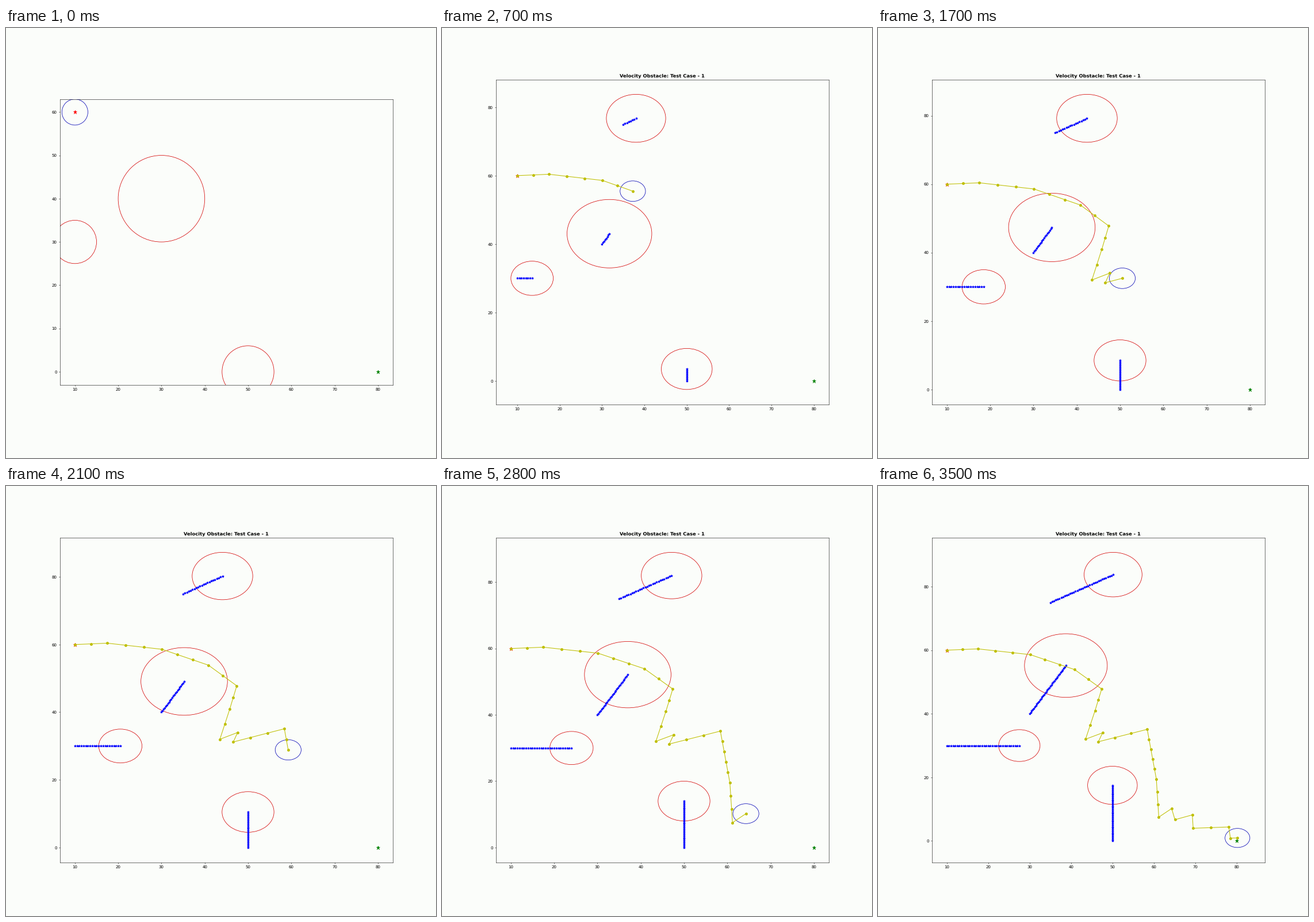
Recreate the animation shown at these times as a matplotlib script. Size 748x748 px, loop 3.6 s.

```python
import numpy as np
import matplotlib.pyplot as plt
from matplotlib.animation import FuncAnimation
from matplotlib.patches import Circle

STEPS = 36
START, GOAL = (10, 60), (80, 0)
ROBOT_R = 3
SPEED = 0.5
PAPER, RED, BLUE = "#fbfdfa", "#d40000", "#0000b4"

# x, y, radius, heading in degrees
OBSTACLES = [(10, 30, 5, 0), (50, 0, 6, 90), (30, 40, 10, 60), (35, 75, 7, 30)]

# Turning points of the robot: step, x, y
TURNS = [
    (0, *START), (2, 17.5, 60.4), (5, 30.1, 58.6), (8, 40.85, 53.9),
    (10, 47.4, 47.8), (12, 45.8, 41), (14, 43.5, 32), (15, 47.6, 34),
    (16, 46.6, 31.2), (19, 58.4, 35.1), (24, 60.6, 19.5), (27, 61.2, 7.5),
    (28, 64.3, 10.2), (29, 65.1, 6.7), (30, 69.3, 8.2), (31, 69.5, 4),
    (33, 78.1, 4.4), (34, 78.5, 0.9), (35, 80.2, 0.95),
]

plt.rcParams["text.hinting"] = "no_hinting"
fig = plt.figure(figsize=(14.96, 14.96), dpi=50, facecolor=PAPER)
ax = fig.add_axes([0.125, 0.125, 0.775, 0.755])


def route(step):
    """Robot positions up to a step, at even pace between turns."""
    t, x, y = zip(*TURNS)
    steps = np.arange(step + 1)
    return np.interp(steps, t, x), np.interp(steps, t, y)


def trail(x, y, heading, step):
    a = np.radians(heading)
    d = SPEED * np.arange(step + 1)
    return x + d * np.cos(a), y + d * np.sin(a)


def draw(step):
    ax.clear()
    ax.set_facecolor(PAPER)
    first = step == 0
    ax.set_aspect("equal" if first else "auto")
    # The opening view is fitted to the start and goal only
    add = ax.add_artist if first else ax.add_patch

    def ring(xs, ys, r, color):
        add(Circle((xs[-1], ys[-1]), r, fill=False, ec=color, lw=1.1))

    ax.plot(*START, "r*", ms=10)
    ax.plot(*GOAL, "g*", ms=10)
    for x, y, r, heading in OBSTACLES:
        path = trail(x, y, heading, step)
        ring(*path, r, RED)
        if not first:
            ax.plot(*path, "b*", ms=6)
    path = route(step)
    ring(*path, ROBOT_R, BLUE)
    if not first:
        ax.plot(*path, "y-o")
        ax.set_title("Velocity Obstacle: Test Case - 1", fontweight="bold")
    ax.autoscale_view()
    return []


anim = FuncAnimation(fig, draw, frames=STEPS, init_func=lambda: draw(0),
                     interval=100, repeat=True, repeat_delay=0)
plt.show()
```
